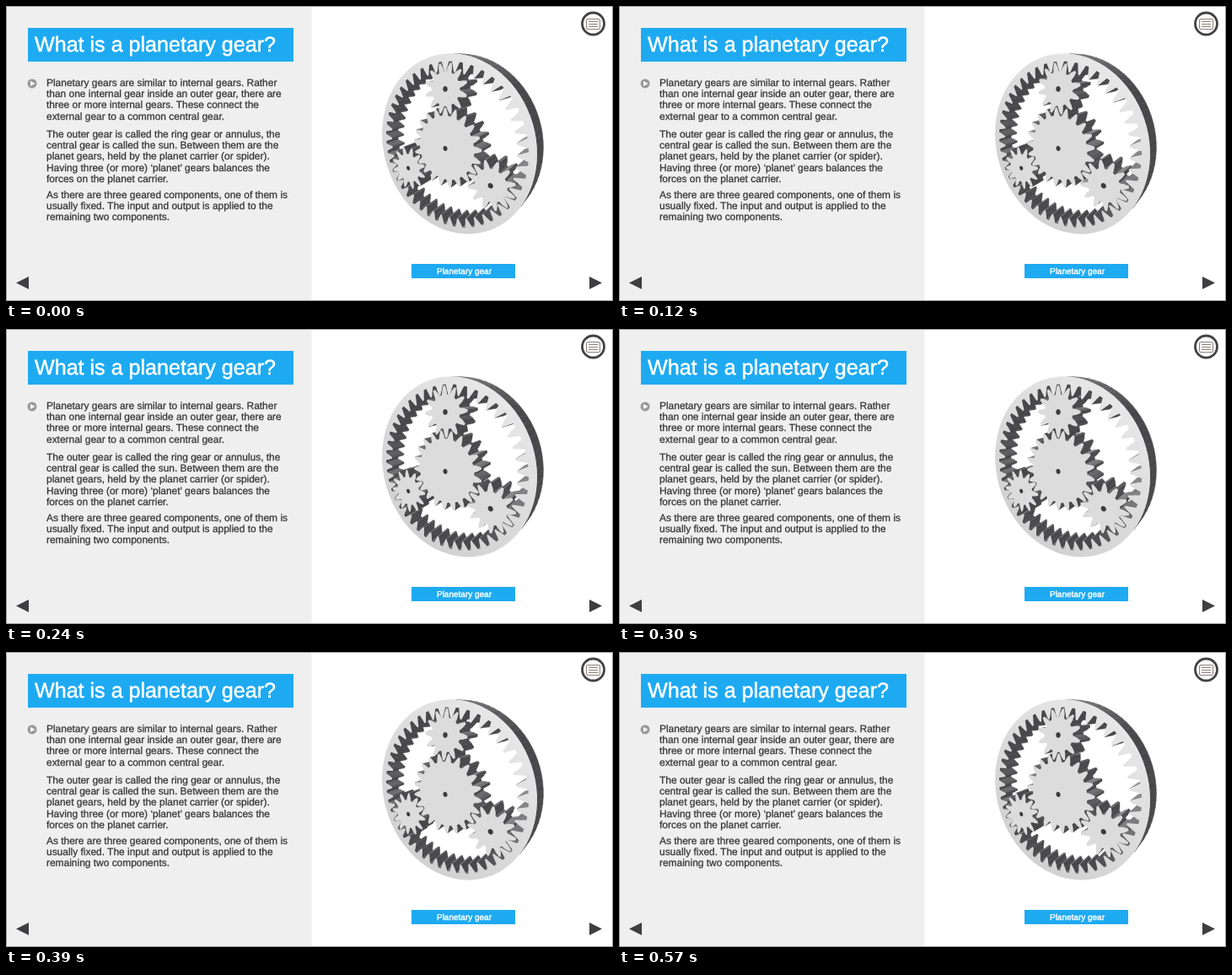
An HTML page with a canvas that plays this animation: 720 px wide and 350 px high, repeating every 0.6 s.

```html
<!DOCTYPE html>
<html lang="en">
<head>
<meta charset="utf-8">
<title>What is a planetary gear?</title>
<style>
html, body { margin: 0; width: 100%; height: 100%; overflow: hidden; background: #fff; }
svg, canvas { position: absolute; left: 0; top: 0; width: 720px; height: 350px; }
text { font-family: "Liberation Sans", Arial, sans-serif; text-rendering: geometricPrecision; }
</style>
</head>
<body>
<svg viewBox="0 0 720 350">
  <rect width="362.5" height="350" fill="#efefef"/>
  <rect x=".5" y=".5" width="719" height="349" fill="none" stroke="#a3a3a3"/>
  <rect x="26" y="26" width="315" height="40" fill="#1eaaf1"/>
  <text x="34" y="54" font-size="25.1" fill="#fff" stroke="#fff" stroke-width=".5">What is a planetary gear?</text>
  <circle cx="31" cy="92" r="5.5" fill="#999"/>
  <path d="M29 89l5.5 3-5.5 3z" fill="#fff"/>
  <g id="copy" font-size="11.95" fill="#333" stroke="#333" stroke-width=".25"></g>
  <rect x="481" y="306" width="123" height="17" fill="#1eaaf1"/>
  <text x="543.5" y="317.5" font-size="10" fill="#fff" stroke="#fff" stroke-width=".4" text-anchor="middle">Planetary gear</text>
  <path d="M12 328.5l15-7.5v15zM707 328.5l-15-7.5v15z" fill="#3f3f41"/>
  <circle cx="696.5" cy="21" r="13" fill="#fff" stroke="#434345" stroke-width="2.8"/>
  <rect x="688.5" y="15.5" width="16" height="12" rx="1.5" fill="#fff" stroke="#8b807a"/>
  <path d="M691 18.5h11M691 21.5h11M691 24.5h11" stroke="#8b807a"/>
</svg>
<canvas id="stage" width="720" height="350"></canvas>
<script>
const paragraphs = [
  [95, ["Planetary gears are similar to internal gears. Rather",
    "than one internal gear inside an outer gear, there are",
    "three or more internal gears. These connect the",
    "external gear to a common central gear."]],
  [156, ["The outer gear is called the ring gear or annulus, the",
    "central gear is called the sun. Between them are the",
    "planet gears, held by the planet carrier (or spider).",
    "Having three (or more) ‘planet’ gears balances the",
    "forces on the planet carrier."]],
  [228, ["As there are three geared components, one of them is",
    "usually fixed. The input and output is applied to the",
    "remaining two components."]]
];
document.getElementById("copy").innerHTML = paragraphs.map(([y, lines]) =>
  lines.map((line, i) => `<text x="48" y="${y + i * 13.2}">${line}</text>`).join("")).join("");

const ctx = document.getElementById("stage").getContext("2d");
const TAU = Math.PI * 2, UP = -TAU / 4;
const LOOP = 600, STEP = 30;
const ORBIT = 0.645;
const directions = [0, 1, 2].map(i => UP + i * TAU / 3);

const ringFill = ctx.createLinearGradient(465, 255, 610, 85);
ringFill.addColorStop(0, "#cecece");
ringFill.addColorStop(0.5, "#dbdbdb");
ringFill.addColorStop(1, "#e8e8e8");

// Perspective view of the gear plane; z runs from front (0) to back (1).
function project([x, y], z = 0) {
  const w = 1 - 0.185 * x + 0.075 * y + 0.06 * z;
  return [521 + (88.5 * x + 13 * z) / w, 169 + (104 * y + 13 * x - 6 * z) / w];
}

// Outline whose tooth phase is given along one direction.
function gear(cx, cy, teeth, root, tip, direction, phase) {
  const pitch = TAU / teeth, mid = (root + tip) / 2, points = [];
  const profile = [[-0.36, root], [-0.23, mid], [-0.08, tip], [0.08, tip], [0.23, mid], [0.36, root]];
  for (let i = 0; i < teeth; i++)
    for (const [offset, r] of profile) {
      const a = direction + (i + offset - phase) * pitch;
      points.push([cx + r * Math.cos(a), cy + r * Math.sin(a)]);
    }
  return points;
}

function circle(cx, cy, r, sides, turn = 0) {
  return Array.from({ length: sides }, (_, i) => {
    const a = turn + i * TAU / sides;
    return [cx + r * Math.cos(a), cy + r * Math.sin(a)];
  });
}

function trace(points) {
  points.forEach((p, i) => i ? ctx.lineTo(...p) : ctx.moveTo(...p));
  ctx.closePath();
}

function fillFace(outlines, fill) {
  ctx.beginPath();
  outlines.forEach(outline => trace(outline.map(p => project(p))));
  ctx.fillStyle = fill;
  ctx.fill("evenodd");
}

// Visible side walls; side is -1 where the solid lies outside the outline.
function walls(outline, side = 1) {
  const found = [];
  outline.forEach((p, i) => {
    const q = outline[(i + 1) % outline.length];
    const a = project(p), b = project(q), c = project(q, 1), d = project(p, 1);
    const nx = (b[1] - a[1]) * side, ny = (a[0] - b[0]) * side;
    if (nx * (d[0] - a[0]) + ny * (d[1] - a[1]) <= 0) return;
    const light = Math.max(0, -0.6 * nx - 0.8 * ny) / Math.hypot(nx, ny);
    found.push({ quad: [a, b, c, d], shade: Math.round(72 + 70 * light), key: 0.23 * (p[0] + q[0]) - 0.11 * (p[1] + q[1]) });
  });
  return found;
}

function draw(progress) {
  const phase = 0.5 - progress;
  const rim = circle(0, 0, 1, 90, progress * TAU / 45);
  const inner = gear(0, 0, 45, 0.925, 0.82, UP, 0.5 + phase);
  const sun = gear(0, 0, 21, 0.362, 0.45, UP, 0.5 - phase);
  const hubs = directions.map(a => [ORBIT * Math.cos(a), ORBIT * Math.sin(a)]);
  const planets = hubs.map(([x, y], i) => gear(x, y, 12, 0.18, 0.27, directions[i], phase));

  ctx.clearRect(0, 0, 720, 350);
  const sides = [...walls(rim), ...walls(inner, -1), ...walls(sun), ...planets.flatMap(p => walls(p))];
  sides.sort((a, b) => a.key - b.key);
  ctx.lineWidth = 0.5;
  for (const { quad, shade } of sides) {
    ctx.beginPath();
    trace(quad);
    ctx.fillStyle = ctx.strokeStyle = `rgb(${shade},${shade},${shade + 2})`;
    ctx.fill();
    ctx.stroke();
  }

  fillFace([rim, inner], ringFill);
  for (const face of [sun, ...planets]) fillFace([face], "#dcdcdc");
  for (const [x, y] of [[0, 0], ...hubs]) fillFace([circle(x, y, 0.029, 20)], "#3c3c3e");
}

function tick() {
  draw(Math.floor(performance.now() % LOOP / STEP) * STEP / LOOP);
  requestAnimationFrame(tick);
}
tick();
</script>
</body>
</html>
```
